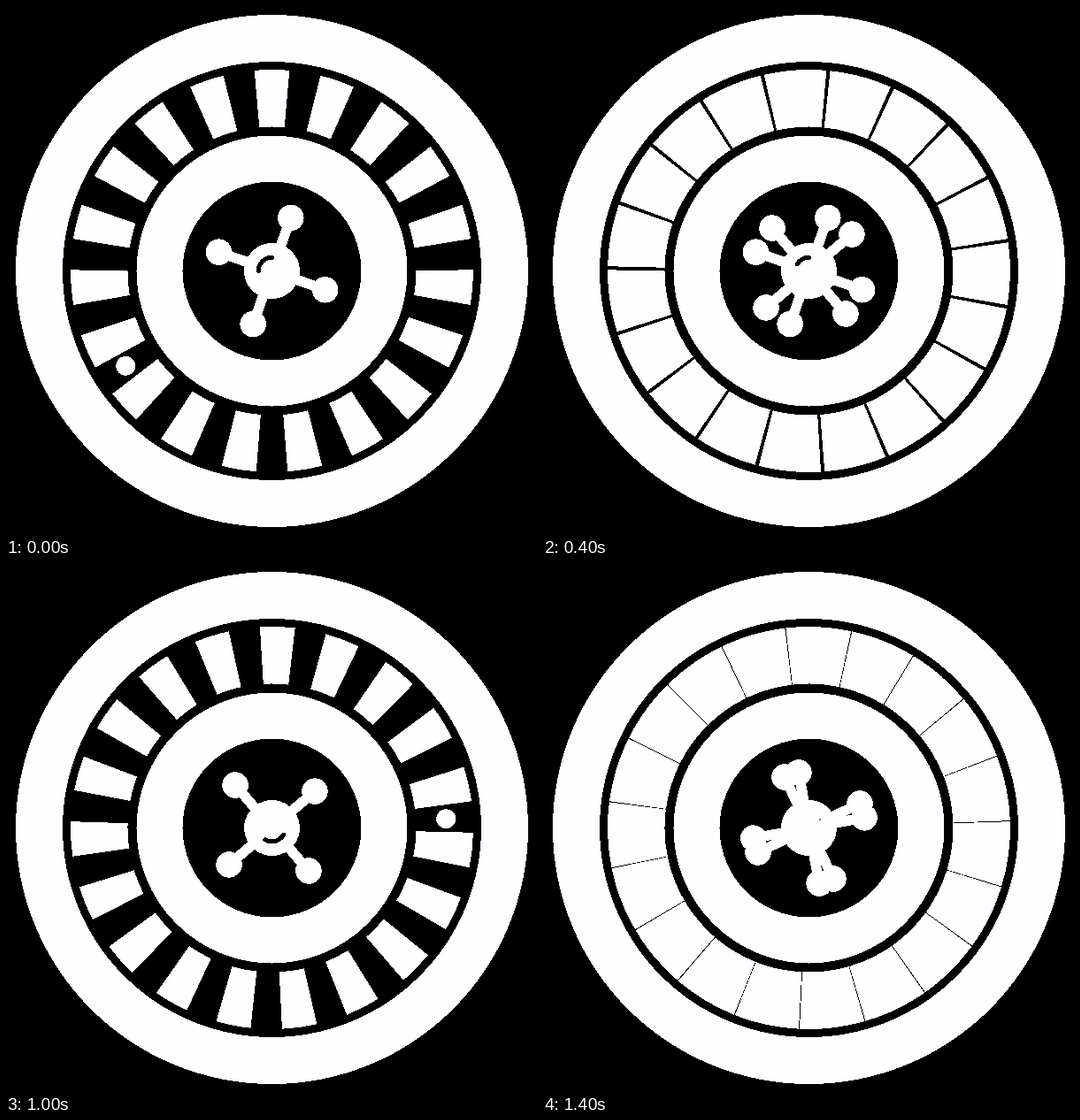
An HTML page that plays this animation: 600x598 px, repeating every 1600 ms.

```html
<!DOCTYPE html>
<html lang="en">
<head>
<meta charset="utf-8">
<title>Roulette wheel</title>
<style>
  html, body { margin: 0; width: 100%; height: 100%; overflow: hidden; background: #000; }
  svg { display: block; width: 600px; height: 598px; shape-rendering: crispEdges; }
  .rotor { mix-blend-mode: lighten; }
</style>
</head>
<body>
<svg viewBox="0 0 600 598">
  <defs>
    <g id="wheel" fill="#fefdff" stroke="#fefdff" stroke-width="0">
      <!-- 19 pockets, each 10 degrees wide -->
      <circle r="195.25" fill="none" stroke-width="64.5" pathLength="342"
              stroke-dasharray="9.5 8.5" transform="rotate(-95)"/>
      <circle cx="197" r="11" transform="rotate(147)"/>
      <g transform="rotate(19.5)">
        <path d="M-63.7 0H63.7M0 -63.7V63.7" stroke-width="11.5"/>
        <circle cx="63.7" r="14.8"/>
        <circle cx="-63.7" r="14.8"/>
        <circle cy="63.7" r="14.8"/>
        <circle cy="-63.7" r="14.8"/>
      </g>
      <circle r="31.5"/>
      <path d="M-10.8 -10.8A15.3 15.3 0 0 1 10.8 -10.8" transform="rotate(-45)"
            fill="none" stroke="#000" stroke-width="5" stroke-linecap="round"/>
    </g>
  </defs>
  <rect width="600" height="598"/>
  <g transform="translate(300.5 299.5)">
    <circle r="289.5" fill="#fefdff"/>
    <circle r="194.75" fill="none" stroke="#000" stroke-width="83.5"/>
    <circle r="101"/>
    <use class="rotor" href="#wheel"/>
    <use class="rotor" href="#wheel"/>
  </g>
</svg>
<script>
  const STEP = 200;
  // Wheel angles per step; a pair shows two overlaid positions.
  const poses = [[0], [0], [0, 30], [45], [120], [210], [330], [405, 510]];
  const rotors = document.querySelectorAll('.rotor');

  function draw(now) {
    const pose = poses[Math.floor(now / STEP) % poses.length];
    rotors.forEach((rotor, i) =>
      rotor.setAttribute('transform', `rotate(${pose[i] ?? pose[0]})`));
  }

  const start = performance.now();
  function tick() {
    draw(performance.now() - start);
    requestAnimationFrame(tick);
  }
  tick();
</script>
</body>
</html>
```
